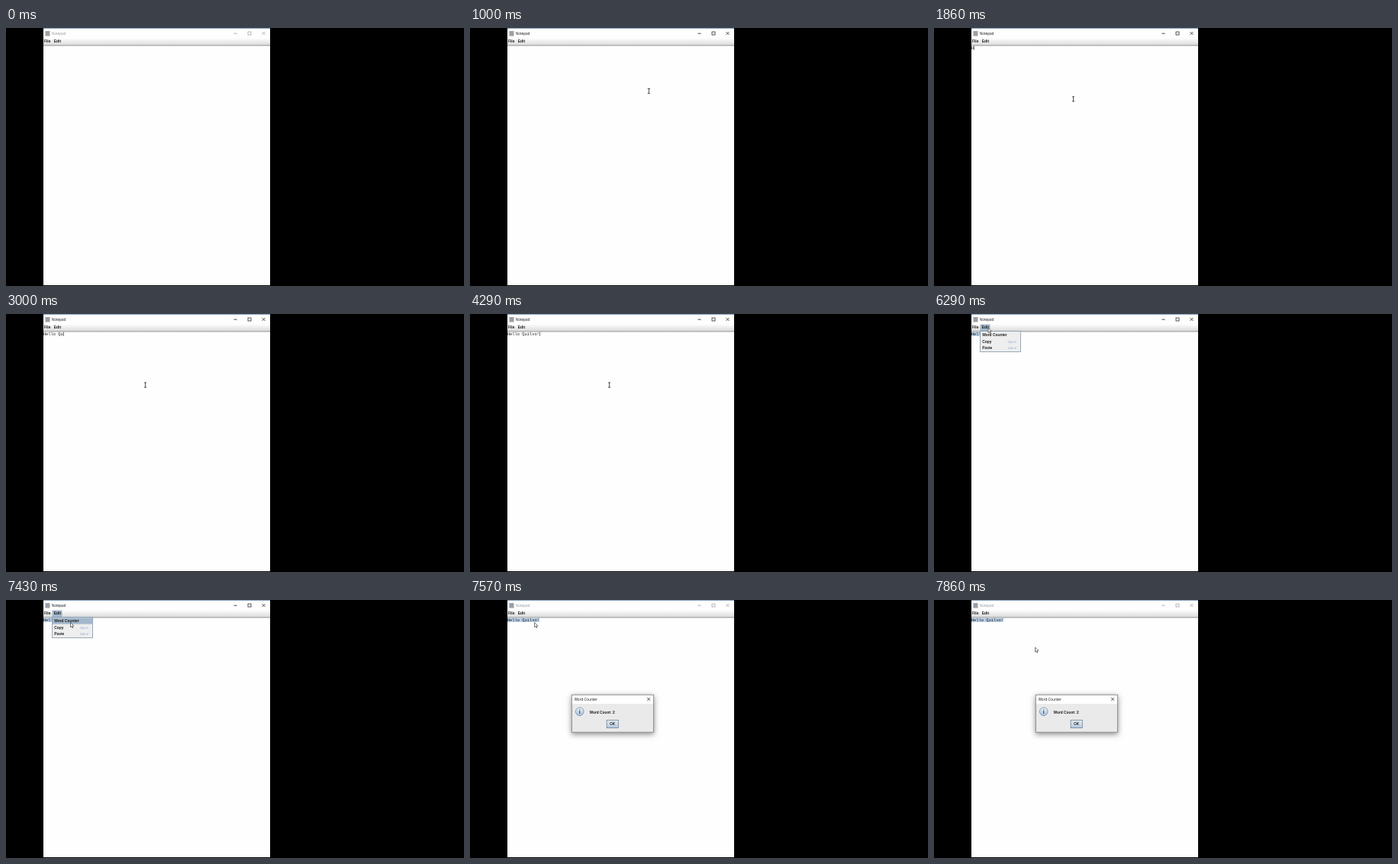
Recreate the animation shown at these times as an HTML page with a canvas. Size 600 by 338 pixels, loop 8 s.

```html
<!DOCTYPE html>
<html>
<head>
<meta charset="utf-8">
<style>
html, body { margin: 0; background: #000; overflow: hidden; }
canvas { display: block; }
</style>
</head>
<body>
<canvas id="stage" width="600" height="338"></canvas>
<script>
const ctx = document.getElementById('stage').getContext('2d');
const LOOP = 8000, FPS = 7;
const UI = '"Open Sans", sans-serif', SANS = '"Liberation Sans", sans-serif';
const BOLD = 'bold 4.9px ' + SANS, TITLE = '4.6px ' + UI;
const MONO = '5.4px "Liberation Mono", monospace';
const MESSAGE = 'Hello Quilvo!', CHAR = 3.24, LEFT = 49;

// All times below are in ticks of 1/7 s.
const KEYS = [13, 15, 16, 16, 18, 19, 20, 21, 22, 23, 25, 27, 29];
const PATH = [
  [5, 338, 62], [8, 182.5, 93], [32, 182.5, 93], [36, 50, 26], [39, 90, 26],
  [40, 84, 25], [42, 71, 18.3], [44, 71, 18.3], [50, 84.5, 29.5],
  [53, 84.5, 29.5], [55, 132.5, 62]
];
const ACTIVE = 7, CARET = 9, SELECT = 36, SELECTED = 39, ARROW = 41, MENU = 44, DIALOG = 53;

function rect(x, y, w, h, fill) {
  ctx.fillStyle = fill;
  ctx.fillRect(x, y, w, h);
}

function frame(x, y, w, h, color, width = 1) {
  ctx.strokeStyle = color;
  ctx.lineWidth = width;
  ctx.strokeRect(x, y, w, h);
}

function text(s, x, y, font, color) {
  ctx.font = font;
  ctx.fillStyle = color;
  ctx.fillText(s, x, y);
}

function lines(color, width, ...segments) {
  ctx.strokeStyle = color;
  ctx.lineWidth = width;
  ctx.beginPath();
  for (const [x1, y1, x2, y2] of segments) {
    ctx.moveTo(x1, y1);
    ctx.lineTo(x2, y2);
  }
  ctx.stroke();
}

function cross(x, y, color) {
  lines(color, 0.7, [x - 2, y - 2, x + 2, y + 2], [x - 2, y + 2, x + 2, y - 2]);
}

function shade(y, h, top, bottom) {
  const g = ctx.createLinearGradient(0, y, 0, y + h);
  g.addColorStop(0, top);
  g.addColorStop(1, bottom);
  return g;
}

function cursorAt(tick) {
  const i = PATH.findIndex(p => p[0] > tick);
  if (i < 0) return PATH[PATH.length - 1].slice(1);
  const [t0, x0, y0] = PATH[i - 1], [t1, x1, y1] = PATH[i];
  const k = (tick - t0) / (t1 - t0);
  return [x0 + (x1 - x0) * k, y0 + (y1 - y0) * k];
}

function drawWindow(active) {
  const ink = active ? '#111' : '#999';
  rect(LEFT, 0, 297, 337, '#fefefe');
  rect(LEFT, 0, 297, 1, '#8ba6c1');
  rect(51.5, 4, 6, 6.5, '#9ba0a6');
  text('Notepad', 59.7, 8.7, TITLE, ink);
  lines(ink, 0.8, [298.5, 7.2, 302.5, 7.2]);
  frame(317, 5, 4, 4, ink, 0.7);
  cross(337.5, 7, ink);
  rect(LEFT, 13, 297, 10, shade(13, 10, '#fff', '#d8d8d8'));
  rect(LEFT, 22.5, 297, 0.9, '#909090');
}

function drawText(tick) {
  const typed = KEYS.filter(k => k <= tick).length;
  const portion = Math.min(1, Math.max(0, (tick - SELECT) / (SELECTED - SELECT)));
  rect(LEFT, 23.4, Math.round(portion * MESSAGE.length) * CHAR, 5.4, '#b8cfe5');
  text(MESSAGE.slice(0, typed), LEFT - 0.2, 27.8, MONO, '#222');
  if (tick >= CARET && tick < SELECT) rect(LEFT + typed * CHAR, 23.5, 0.6, 5.4, '#222');
}

function drawMenu(open, hover) {
  if (open) rect(60.5, 13.5, 13, 9, '#a3b8cc');
  text('File', 50, 19.3, BOLD, '#222');
  text('Edit', 62.8, 19.3, BOLD, '#222');
  if (!open) return;
  rect(60.5, 22.5, 53, 27, '#eee');
  if (hover) rect(61, 23.3, 52, 8.3, '#a3b8cc');
  frame(60.5, 22.5, 53, 27, '#8296aa', 0.8);
  ['Word Counter', 'Copy', 'Paste'].forEach((s, i) => {
    const y = 29.3 + i * 8.5;
    text(s, 63.2, y, BOLD, '#222');
    if (i) text('Ctrl-' + 'CV'[i - 1], 97, y, '4.2px ' + SANS, '#7f98c8');
  });
}

function drawDialog() {
  ctx.save();
  ctx.shadowColor = 'rgba(0,0,0,.45)';
  ctx.shadowBlur = 7;
  ctx.shadowOffsetY = 2;
  rect(133, 124, 108, 49.5, '#eaeaea');
  ctx.restore();
  rect(133, 124, 108, 12, '#fff');
  frame(133.3, 124.2, 107.2, 49, '#777', 0.8);
  text('Word Counter', 136.7, 131.7, TITLE, '#111');
  cross(234, 129.8, '#111');

  ctx.beginPath();
  ctx.arc(143.7, 146.2, 5.3, 0, 7);
  ctx.fillStyle = shade(141, 10.5, '#eef4fa', '#a9c1da');
  ctx.fill();
  ctx.strokeStyle = '#7388a5';
  ctx.lineWidth = 0.8;
  ctx.stroke();
  text('i', 142.6, 149, 'bold 8px "Liberation Serif", serif', '#3d5688');

  text('Word Count: 2', 156.6, 148.9, 'bold 4.8px ' + SANS, '#222');
  rect(179, 157.2, 15.5, 10.3, shade(157, 10.5, '#fff', '#b8cfe5'));
  frame(179.2, 157.4, 15, 10, '#6f8296', 0.9);
  frame(181.7, 159.4, 10, 6, '#a3b8cc', 0.5);
  text('OK', 183, 164.2, BOLD, '#222');
}

function drawCursor(tick) {
  if (tick < PATH[0][0] || tick === SELECTED) return;
  const [x, y] = cursorAt(tick);
  if (tick < ARROW) {
    lines('#222', 0.8, [x, y - 3, x, y + 3],
      [x - 1.6, y - 3.1, x + 1.6, y - 3.1], [x - 1.6, y + 3.1, x + 1.6, y + 3.1]);
    return;
  }
  const tip = [[0, 0], [0, 6], [1.4, 4.8], [2.4, 7], [3.4, 6.6], [2.5, 4.4], [4.3, 4.3]];
  ctx.beginPath();
  for (const [dx, dy] of tip) ctx.lineTo(x + dx, y + dy);
  ctx.closePath();
  ctx.fillStyle = '#fff';
  ctx.fill();
  ctx.strokeStyle = '#222';
  ctx.lineWidth = 0.6;
  ctx.stroke();
}

function draw(now) {
  const tick = Math.floor((now % LOOP + 5) * FPS / 1000) % (LOOP * FPS / 1000);
  const dialog = tick >= DIALOG;
  rect(0, 0, 600, 338, '#000');
  drawWindow(tick >= ACTIVE && !dialog);
  drawText(tick);
  drawMenu(tick >= MENU && !dialog, tick >= MENU + 3);
  if (dialog) drawDialog();
  drawCursor(tick);
}

let start;
function loop(now) {
  start ??= now;
  draw(now - start);
  requestAnimationFrame(loop);
}
requestAnimationFrame(loop);
</script>
</body>
</html>
```
